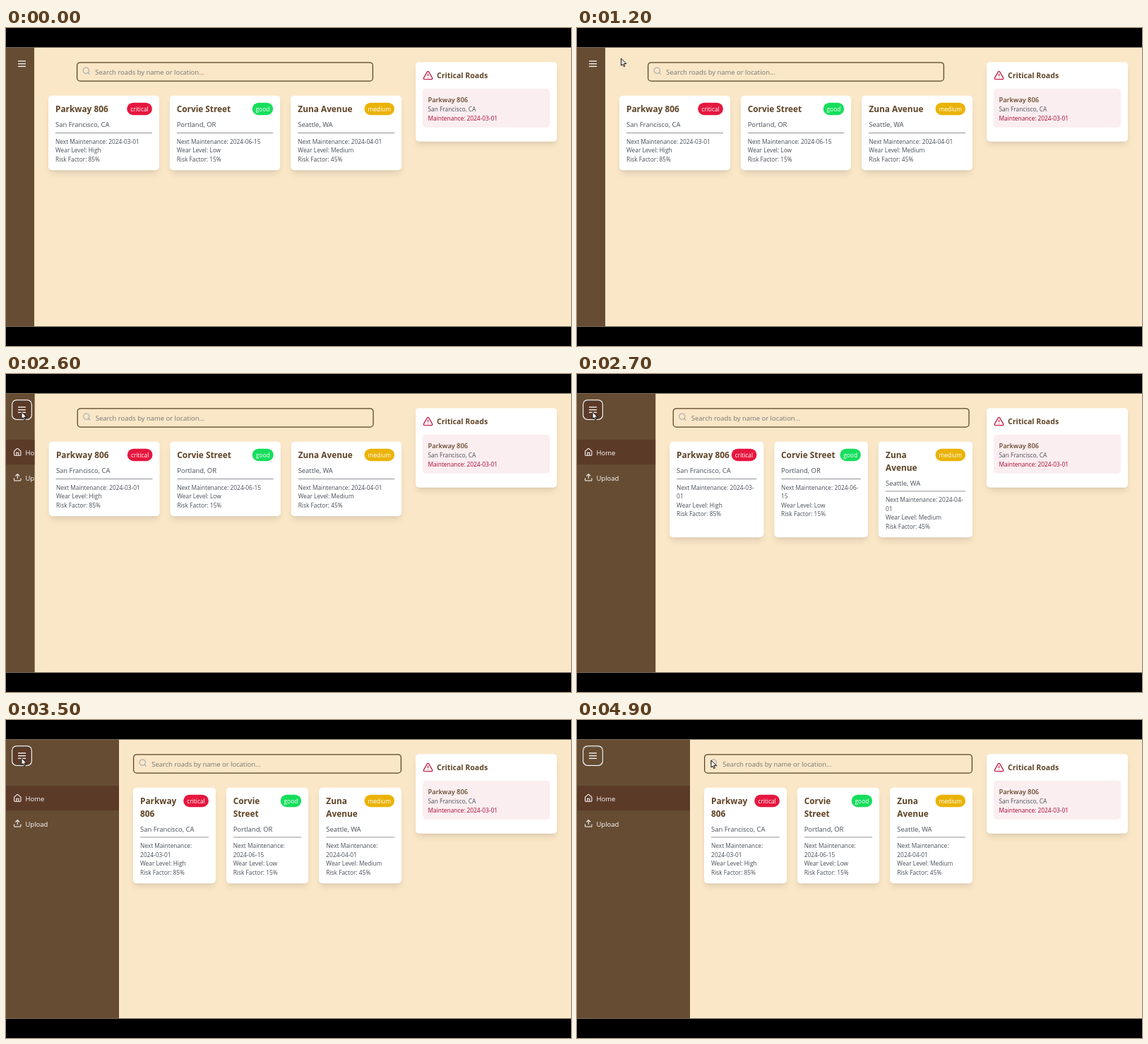
Write an HTML page that moves like this. It is 800 px wide and 450 px high and loops after 5 s.

```html
<!DOCTYPE html>
<html lang="en">
<head>
<meta charset="utf-8">
<title>Road dashboard</title>
<style>
* { box-sizing: border-box; margin: 0; padding: 0; }
html, body { width: 100%; height: 100%; overflow: hidden; background: #000; }
body { font: 15.1px/24px "Open Sans", "Noto Sans", sans-serif; color: #474d55; }
svg { display: block; fill: none; stroke: currentColor; stroke-width: 2; stroke-linecap: round; stroke-linejoin: round; flex: none; }
h2, h3, p, .label { position: relative; top: 1px; }

/* a 1280px wide page shown at 800px */
#app { position: absolute; left: 0; top: 0; width: 1280px; height: 632px; transform: translateY(27.5px) scale(.625); transform-origin: 0 0; background: #fae7c7; overflow: hidden; }

#side { position: absolute; left: 0; top: 0; height: 100%; background: #664c32; color: #fff; overflow: hidden; }
#menu { position: absolute; left: 16px; top: 17px; width: 40px; height: 40px; padding: 8px; border-radius: 8px; }
#menu.focus { box-shadow: 0 0 0 1px #20150e, 0 0 0 3px #fff; }
#nav { position: absolute; top: 105px; width: 100%; }
.item { display: flex; align-items: center; gap: 8px; height: 56px; padding: 0 16px; margin-bottom: 1px; }
.item.on { background: #5c3a28; }

#main { position: absolute; right: 384px; top: 33px; }
#search { position: relative; max-width: 672px; height: 44px; margin: 0 auto 32px; padding: 8px 0 0 40px; border: 2px solid #5a4023; border-radius: 8px; color: #777674; white-space: nowrap; }
#search svg { position: absolute; left: 10px; top: 8px; color: #9ca3af; }
#cards { display: grid; grid-template-columns: repeat(3, minmax(0, 1fr)); gap: 24px; }

.box { background: #fff; border-radius: 8px; padding: 16px; box-shadow: 0 10px 15px -3px rgba(0, 0, 0, .1), 0 4px 6px -4px rgba(0, 0, 0, .1); }
.head { display: flex; justify-content: space-between; align-items: flex-start; margin-bottom: 8px; }
h2 { font-size: 18.96px; line-height: 28px; font-weight: 700; color: #5f4325; }
.badge { flex: none; height: 28px; padding: 5px 8px; border-radius: 14px; color: #fff; font-size: 13.36px; line-height: 20px; }
.facts { margin-top: 8px; padding-top: 8px; border-top: 1px solid #4a5058; font-size: 13.36px; line-height: 20px; }

#panel { position: absolute; left: 928px; top: 33px; width: 320px; height: 180px; }
#panel .top { display: flex; align-items: center; gap: 8px; height: 28px; margin-bottom: 16px; color: #c0143f; }
#panel h2 { font-size: 16.9px; }
.alert { height: 88px; padding: 12px; border-radius: 8px; background: #fbeef0; font-size: 13.36px; line-height: 20px; }
.alert h3 { font-size: 14.8px; line-height: 24px; font-weight: 600; color: #5f4325; }
.alert .due { color: #a90533; }

#cursor { position: absolute; left: 0; top: 0; stroke: #111; stroke-width: 1; fill: #fff; }
</style>
</head>
<body>
<div id="app">
  <div id="main">
    <div id="search">
      <svg width="20" height="20" viewBox="0 0 24 24"><circle cx="11" cy="11" r="8"/><path d="M21 21l-4.3-4.3"/></svg>
      <div class="label">Search roads by name or location...</div>
    </div>
    <div id="cards"></div>
  </div>

  <div id="panel" class="box">
    <div class="top">
      <svg width="24" height="24" viewBox="0 0 24 24"><path d="M21.7 18l-8-14a2 2 0 0 0-3.4 0l-8 14A2 2 0 0 0 4 21h16a2 2 0 0 0 1.7-3zM12 9v4M12 17h.01"/></svg>
      <h2>Critical Roads</h2>
    </div>
    <div class="alert">
      <h3>Parkway 806</h3>
      <p>San Francisco, CA</p>
      <p class="due">Maintenance: 2024-03-01</p>
    </div>
  </div>

  <div id="side">
    <div id="menu"><svg width="24" height="24" viewBox="0 0 24 24"><path d="M4 6h16M4 12h16M4 18h16"/></svg></div>
    <div id="nav">
      <div class="item on">
        <svg width="20" height="20" viewBox="0 0 24 24"><path d="M3 10a2 2 0 0 1 .7-1.5l7-6a2 2 0 0 1 2.6 0l7 6A2 2 0 0 1 21 10v9a2 2 0 0 1-2 2H5a2 2 0 0 1-2-2zM9 21v-8h6v8"/></svg>
        <span class="label">Home</span>
      </div>
      <div class="item">
        <svg width="20" height="20" viewBox="0 0 24 24"><path d="M21 15v4a2 2 0 0 1-2 2H5a2 2 0 0 1-2-2v-4M17 8l-5-5-5 5M12 3v12"/></svg>
        <span class="label">Upload</span>
      </div>
    </div>
  </div>

  <svg id="cursor" width="16" height="22.4" viewBox="-1 -1 10 14"><path d="M0 0V9.6L2.2 7.6L3.8 11.2L5.4 10.5L3.8 7H7Z"/></svg>
</div>

<script>
const LOOP = 5000, TICK = 100, SCALE = .625, TOP = 27.5;
const CLICK = 2583, OPEN_MS = 300, FADE_MS = 150;
const HOVER_IN = 1620, HOVER_OUT = 4690;

const roads = [
  ['Parkway 806', 'San Francisco, CA', 'critical', '#e5173f', '2024-03-01', 'High', 85],
  ['Corvie Street', 'Portland, OR', 'good', '#16de5c', '2024-06-15', 'Low', 15],
  ['Zuna Avenue', 'Seattle, WA', 'medium', '#eab308', '2024-04-01', 'Medium', 45]
];

// time, x, y of the pointer tip on the stage
const path = [
  [900, 76, 12], [1200, 62.5, 43.5], [1350, 60, 44.5], [1700, 22, 54],
  [3800, 22, 54], [4000, 21.3, 54], [4550, 21.3, 54], [4700, 42, 55], [4900, 190, 57.5]
];

const $ = id => document.getElementById(id);
const side = $('side'), menu = $('menu'), nav = $('nav'), main = $('main'), cursor = $('cursor');

$('cards').innerHTML = roads.map(([name, place, state, color, date, wear, risk]) => `
  <div class="box">
    <div class="head"><h2>${name}</h2><span class="badge" style="background:${color}">${state}</span></div>
    <p>${place}</p>
    <div class="facts">
      <p>Next Maintenance: ${date}</p><p>Wear Level: ${wear}</p><p>Risk Factor: ${risk}%</p>
    </div>
  </div>`).join('');

const clamp = v => Math.min(1, Math.max(0, v));
const smooth = s => s * s * (3 - 2 * s);

// cubic-bezier(.4, 0, .2, 1)
function ease(x) {
  let lo = 0, hi = 1;
  for (let i = 0; i < 24; i++) {
    const s = (lo + hi) / 2, r = 1 - s;
    if (1.2 * s * r * r + .6 * s * s * r + s * s * s < x) lo = s; else hi = s;
  }
  return smooth((lo + hi) / 2);
}

function pointer(t) {
  const i = path.findIndex(p => p[0] > t);
  if (i < 0) return path[path.length - 1].slice(1);
  if (i === 0) return path[0].slice(1);
  const a = path[i - 1], b = path[i], k = smooth((t - a[0]) / (b[0] - a[0]));
  return [a[1] + (b[1] - a[1]) * k, a[2] + (b[2] - a[2]) * k];
}

function draw(t) {
  const width = 64 + 192 * ease(clamp((t - CLICK) / OPEN_MS));
  side.style.width = width + 'px';
  main.style.left = width + 32 + 'px';
  nav.style.display = t >= CLICK ? 'block' : 'none';

  const hover = ease(clamp((t - HOVER_IN) / FADE_MS)) - ease(clamp((t - HOVER_OUT) / FADE_MS));
  menu.style.background = `rgba(92, 58, 40, ${hover})`;
  menu.className = t >= CLICK ? 'focus' : '';

  const [x, y] = pointer(t);
  cursor.style.transform = `translate(${(x - 1) / SCALE}px, ${(y - 1 - TOP) / SCALE}px)`;
  cursor.style.visibility = t < path[0][0] ? 'hidden' : 'visible';
}

function frame() {
  const t = performance.now() % LOOP;
  draw(Math.floor(t / TICK) * TICK);
  requestAnimationFrame(frame);
}
draw(0);
requestAnimationFrame(frame);
</script>
</body>
</html>
```
